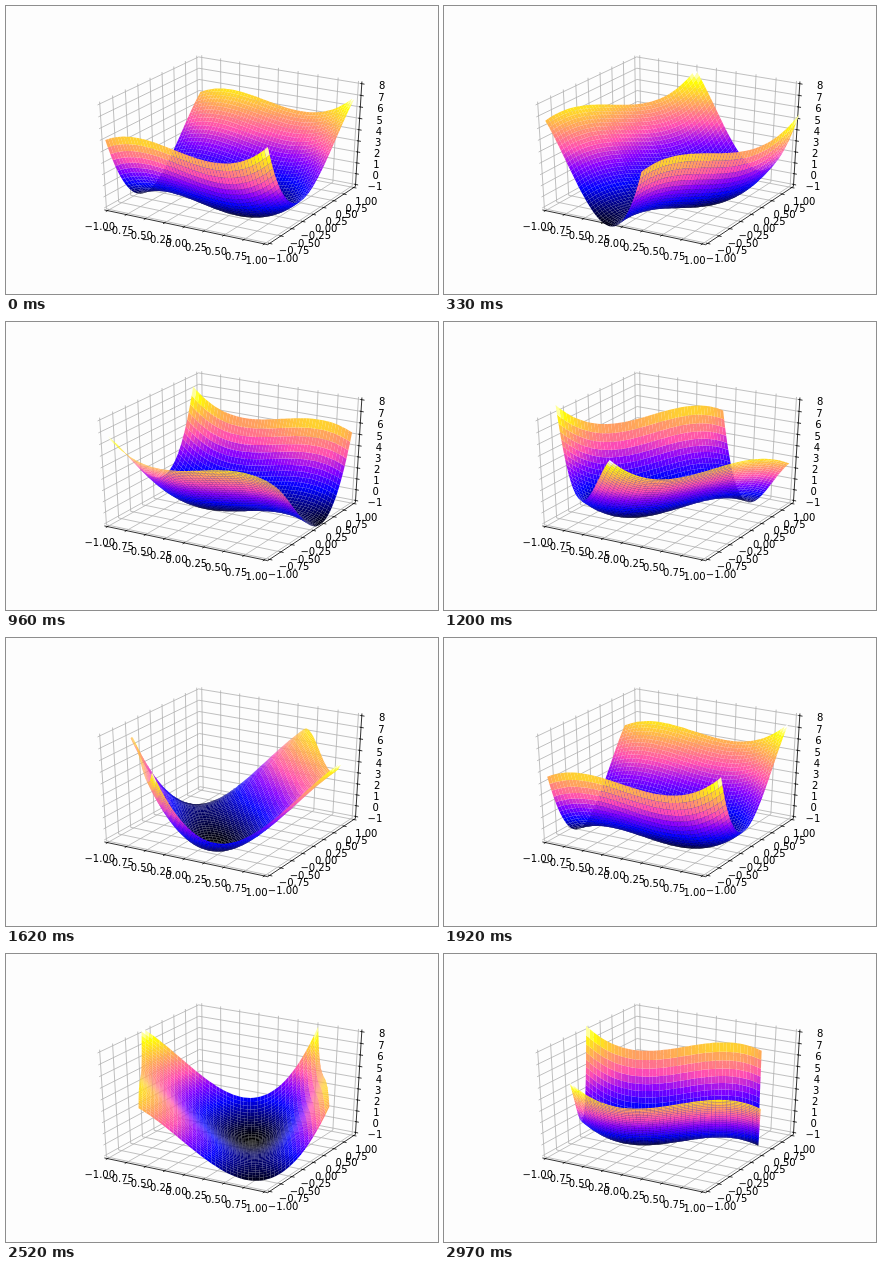
Animation, 432 px wide and 288 px high, one loop 3000 ms. Source, as an HTML page with a canvas:

```html
<!DOCTYPE html>
<html lang="en">
<head>
<meta charset="utf-8">
<title>Rotating surface</title>
<style>
  html, body { margin: 0; width: 432px; height: 288px; overflow: hidden; background: #fdfdfd; }
  svg, canvas { position: absolute; left: 0; top: 0; display: block; }
  text { font: 10px "DejaVu Sans", sans-serif; text-anchor: middle; fill: #000; }
  path { fill: none; stroke-width: .8; }
  .grid { stroke: #b0b0b0; }
  .axis { stroke: #000; }
</style>
</head>
<body>
<svg id="axes" width="432" height="288"></svg>
<canvas id="surface" width="432" height="288"></canvas>
<script>
const STEP_MS = 30, STEPS = 100, TURN = 0.1;
const CELLS = 50;
const Z_MIN = -1, Z_MAX = 8;
const COS30 = Math.sqrt(3) / 2;

// Perspective camera at azimuth -60, elevation 30, ten units from a unit cube.
function project(a, b, c) {
  const side = COS30 * a + 0.5 * b;
  const near = 0.5 * a - COS30 * b;
  const up = COS30 * c - 0.5 * near;
  const dist = 10 - COS30 * near - 0.5 * c;
  return [225.92 + 1809.7 * side / dist, 140.34 - 1175.4 * up / dist, dist];
}

const cubeZ = z => (z - Z_MIN) / (Z_MAX - Z_MIN) - 0.5;

function height(u, v) {
  const along = 2.3 * u ** 3 + 0.9 * u * u - 1.3 * u - 0.9;
  const across = 6 * v * v + 3.5 * v * (1 - v * v);
  return along + across;
}

// Black, blue, violet, pink, orange, yellow, white for x from 0 to 1.
function colour(x) {
  const blue = x < 0.25 ? 4 * x : x < 0.42 ? 1 : x < 0.92 ? 1.84 - 2 * x : 12.5 * x - 11.5;
  const rgb = [x / 0.32 - 0.78125, 2 * x - 0.84, blue];
  return `rgb(${rgb.map(k => Math.round(255 * Math.min(1, Math.max(0, k))))})`;
}

function drawAxes() {
  const edge = 0.5 + 1 / 48, delta = 1 / 12;
  const tickIn = edge - 0.1 * delta, tickOut = edge + 0.2 * delta;
  const label = edge + delta;
  const grid = [], axis = [], texts = [];

  const line = pts => 'M' + pts.map(p =>
    project(...p).slice(0, 2).map(k => k.toFixed(2)).join()).join('L');
  // Labels hang just below their anchor, on whole pixel rows.
  const text = (p, s) => {
    const [x, y] = project(...p);
    texts.push(`<text x="${x.toFixed(2)}" y="${Math.round(y + 6.9)}">${s.replace('-', '\u2212')}</text>`);
  };

  for (let i = 0; i <= 8; i++) {
    const k = i / 8 - 0.5, name = (2 * k).toFixed(2);
    grid.push(line([[k, -edge, -edge], [k, edge, -edge], [k, edge, edge]]));
    grid.push(line([[edge, k, -edge], [-edge, k, -edge], [-edge, k, edge]]));
    axis.push(line([[k, -tickIn, -edge], [k, -tickOut, -edge]]));
    axis.push(line([[tickIn, k, -edge], [tickOut, k, -edge]]));
    text([k, -label, -label], name);
    text([label, k, -label], name);
  }
  for (let z = Z_MIN; z <= Z_MAX; z++) {
    const k = cubeZ(z);
    grid.push(line([[-edge, -edge, k], [-edge, edge, k], [edge, edge, k]]));
    axis.push(line([[tickIn, edge, k], [tickOut, edge, k]]));
    text([label, label, k], String(z));
  }
  axis.push(line([[-edge, -edge, -edge], [edge, -edge, -edge], [edge, edge, -edge], [edge, edge, edge]]));

  document.getElementById('axes').innerHTML =
    `<path class="grid" d="${grid.join('')}"/><path class="axis" d="${axis.join('')}"/>${texts.join('')}`;
}

const nodes = [], quads = [];
const row = CELLS + 1;
for (let i = 0; i <= CELLS; i++) {
  for (let j = 0; j <= CELLS; j++) {
    const u = 2 * j / CELLS - 1, v = 2 * i / CELLS - 1;
    nodes.push({ u, v, z: height(u, v) });
  }
}
for (let i = 0; i < CELLS; i++) {
  for (let j = 0; j < CELLS; j++) {
    const n = i * row + j;
    const ids = [n, n + 1, n + row + 1, n + row];
    const mean = ids.reduce((sum, id) => sum + nodes[id].z, 0) / 4;
    quads.push({ ids, mean, depth: 0 });
  }
}

// The colour range spans the lowest to the highest cell.
const means = quads.map(q => q.mean);
const low = Math.min(...means), high = Math.max(...means);
for (const q of quads) q.fill = colour((q.mean - low) / (high - low));

const ctx = document.getElementById('surface').getContext('2d');

function drawSurface(angle) {
  const c = Math.cos(angle) / 2, s = Math.sin(angle) / 2;
  const pts = nodes.map(({ u, v, z }) => project(u * c - v * s, u * s + v * c, cubeZ(z)));
  for (const q of quads) q.depth = q.ids.reduce((sum, id) => sum + pts[id][2], 0);
  const order = quads.slice().sort((p, q) => q.depth - p.depth);

  ctx.clearRect(0, 0, 432, 288);
  for (const { ids, fill } of order) {
    ctx.fillStyle = fill;
    ctx.beginPath();
    for (const id of ids) ctx.lineTo(pts[id][0], pts[id][1]);
    ctx.closePath();
    ctx.fill();
  }
}

const start = performance.now();
let shown = -1;
function tick() {
  const step = Math.floor((performance.now() - start) / STEP_MS) % STEPS;
  if (step !== shown) {
    shown = step;
    drawSurface(step * TURN);
  }
  requestAnimationFrame(tick);
}

drawAxes();
tick();
</script>
</body>
</html>
```
